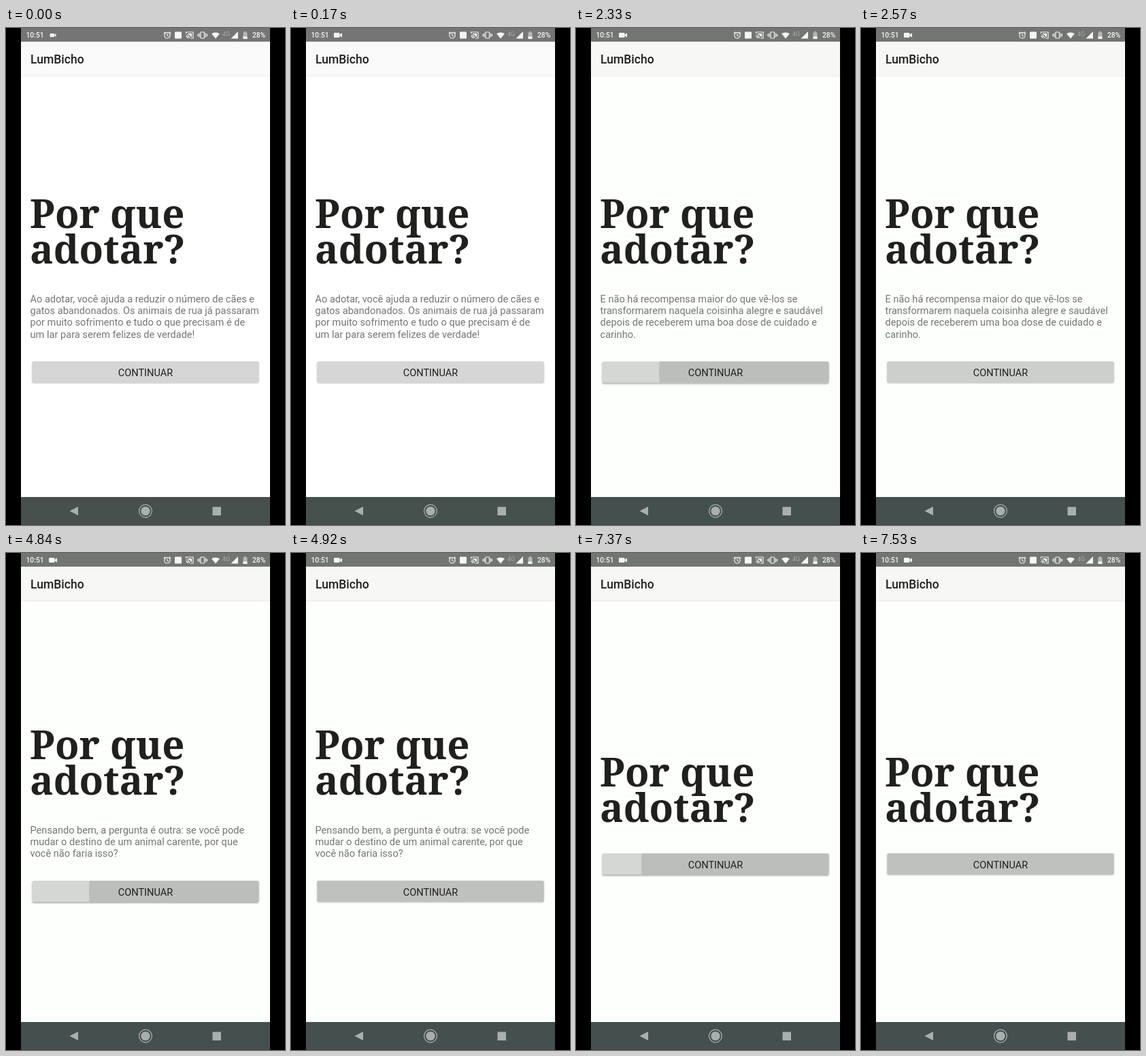
An HTML page for the animation above (7610 ms loop, 410 by 728 pixels).

```html
<!DOCTYPE html>
<html lang="pt-BR">
<head>
<meta charset="utf-8">
<title>Por que adotar?</title>
<style>
  html, body { margin: 0; width: 100%; height: 100%; overflow: hidden; background: #000; }
  svg { display: block; width: 410px; height: 728px; font-family: Roboto, "Noto Sans", sans-serif; }
  text { white-space: pre; }
  .title { font: 700 58px "Noto Serif", serif; fill: #20211f; }
  .body { font-size: 14.6px; fill: #747673; }
  .label { font-size: 14.6px; fill: #20211f; text-anchor: middle; }
  .bar { font-size: 17.5px; font-weight: 500; fill: #20211f; }
  .status { font-size: 10.3px; font-weight: 500; fill: #f5f6f4; }
  .line { fill: none; stroke: #f5f6f4; stroke-width: 1.2; }
</style>
</head>
<body>
<svg viewBox="0 0 410 728">
  <defs>
    <clipPath id="face"><rect x="38.5" y="488.4" width="333" height="31.2" rx="1.8"/></clipPath>
    <filter id="soft" x="-5%" y="-30%" width="110%" height="170%"><feGaussianBlur stdDeviation="1.2"/></filter>
    <linearGradient id="edge" x1="0" y1="0" x2="0" y2="1">
      <stop offset="0" stop-color="#000" stop-opacity=".07"/>
      <stop offset="1" stop-color="#000" stop-opacity="0"/>
    </linearGradient>
  </defs>

  <rect id="page" x="22" y="20" width="366" height="667"/>
  <rect id="header" x="22" y="20" width="366" height="49"/>
  <rect x="22" y="69" width="366" height="3" fill="url(#edge)"/>
  <rect id="top" x="22" width="366" height="20"/>
  <rect id="nav" x="22" y="687" width="366" height="41"/>

  <g class="status">
    <text x="29.5" y="14">10:51</text>
    <g id="camera"><rect x="63" y="7" width="8.5" height="7" rx="1"/><path d="M71.5 9.7L75 7.2V13.8L71.5 11.3Z"/></g>
    <g class="line">
      <circle cx="237" cy="10.8" r="4.2"/>
      <path d="M237 8.2V11L239 12.2M231.8 8L234.2 5.8M242.2 8L239.8 5.8"/>
      <path d="M264.5 8V6H275V15H271M264.5 10A5 5 0 0 1 269.5 15M264.5 12.4A2.6 2.6 0 0 1 267.1 15"/>
      <rect x="286" y="6" width="5.5" height="9" rx=".8"/>
      <path d="M284 7.5V13.5M293.5 7.5V13.5M282 8.8V12.2M295.5 8.8V12.2"/>
    </g>
    <path d="M267 8H273V13H271.5Q270.5 9.5 267 9Z"/>
    <rect x="248" y="5.5" width="10" height="10" rx="1"/>
    <path d="M302 8.3Q308 4.5 314 8.3L308 15.5Z"/>
    <text x="318" y="11.5" style="font-size:9px;font-weight:400" fill="#a8a9a7">4G</text>
    <path d="M341 5V15.5H330.5Z"/>
    <path d="M348.5 6.5H350V5H353V6.5H354.5V16H348.5Z" fill="#b5b6b4"/>
    <path d="M348.5 12.5H354.5V16H348.5Z"/>
    <text x="362" y="14">28%</text>
  </g>
  <text class="bar" x="36" y="51.5">LumBicho</text>

  <g id="heading" class="title">
    <text x="35" y="293">Por que</text>
    <text x="35" y="345">adotar?</text>
  </g>
  <g id="copy" class="body"></g>

  <g id="button">
    <rect id="shadow" x="38.5" y="489" width="333" height="31" rx="2" filter="url(#soft)"/>
    <g clip-path="url(#face)">
      <rect id="fill" x="38" y="488" width="334" height="33"/>
      <circle id="ripple" cx="300" cy="504" r="0" fill="#bcbebb"/>
    </g>
    <text class="label" x="205" y="510">CONTINUAR</text>
  </g>

  <g fill="#a9afad">
    <path d="M93.5 707.5L106 701V714Z"/>
    <circle cx="205" cy="707.5" r="6.6"/>
    <circle cx="205" cy="707.5" r="9.4" fill="none" stroke="#a9afad" stroke-width="1.3"/>
    <rect x="303.5" y="701.5" width="12.5" height="12.5"/>
  </g>
</svg>
<script>
const LOOP = 7610;
const $ = id => document.getElementById(id);

// shift: how far the centred layout closes in as the copy gets shorter
const pages = [
  { shift: 0, lines: [
    "Ao adotar, você ajuda a reduzir o número de cães e",
    "gatos abandonados. Os animais de rua já passaram",
    "por muito sofrimento e tudo o que precisam é de",
    "um lar para serem felizes de verdade!"] },
  { shift: 0, lines: [
    "E não há recompensa maior do que vê-los se",
    "transformarem naquela coisinha alegre e saudável",
    "depois de receberem uma boa dose de cuidado e",
    "carinho."] },
  { shift: 8.5, lines: [
    "Pensando bem, a pergunta é outra: se você pode",
    "mudar o destino de um animal carente, por que",
    "você não faria isso?"] },
  { shift: 48.5, lines: [] }
];

// time, page, button grey, left edge of the ripple (0 = none)
const steps = [
  [0, 0, 213, 0],
  [2330, 1, 213, 122], [2410, 1, 191, 0], [2490, 1, 198, 0], [2570, 1, 205, 0],
  [4840, 2, 213, 122], [4920, 2, 191, 0], [5000, 2, 198, 0], [5090, 2, 205, 0],
  [7370, 3, 213, 96], [7450, 3, 188, 0], [7530, 3, 191, 0]
];

// surface colours settle from neutral to a slightly green tint
const tints = {
  page: [[255, 255, 255], [253, 255, 252]],
  header: [[249, 249, 249], [247, 248, 246]],
  top: [[117, 117, 117], [115, 117, 114]],
  nav: [[72, 80, 77], [68, 79, 78]]
};
const settleTimes = [80, 160, 240, 320, 410];

const rgb = c => `rgb(${c.map(Math.round)})`;
const mix = (a, b, k) => a.map((v, i) => v + (b[i] - v) * k);

let shownPage = -1;
function showPage(n) {
  if (n === shownPage) return;
  shownPage = n;
  const { shift, lines } = pages[n];
  $("heading").setAttribute("transform", `translate(0 ${shift})`);
  $("button").setAttribute("transform", `translate(0 ${-shift})`);
  $("copy").innerHTML = lines.map((line, i) =>
    `<text x="35.5" y="${402 + shift + i * 17.2}">${line}</text>`).join("");
}

function draw(t) {
  const [, page, grey, edge] = steps.findLast(s => s[0] <= t);
  showPage(page);

  const settled = settleTimes.filter(s => s <= t).length / settleTimes.length;
  for (const id in tints) $(id).setAttribute("fill", rgb(mix(...tints[id], settled)));
  const size = settled ? 1 : 0.75;
  $("camera").setAttribute("transform", `translate(69 10.5) scale(${size}) translate(-69 -10.5)`);

  $("fill").setAttribute("fill", rgb([grey, grey + 1.6 * settled, grey - settled]));
  $("ripple").setAttribute("r", edge ? 300 - edge : 0);
  $("shadow").setAttribute("y", edge ? 490.5 : 489.3);
  $("shadow").setAttribute("fill-opacity", edge ? 0.3 : 0.27);
}

function tick() {
  draw(performance.now() % LOOP);
  requestAnimationFrame(tick);
}
tick();
</script>
</body>
</html>
```
